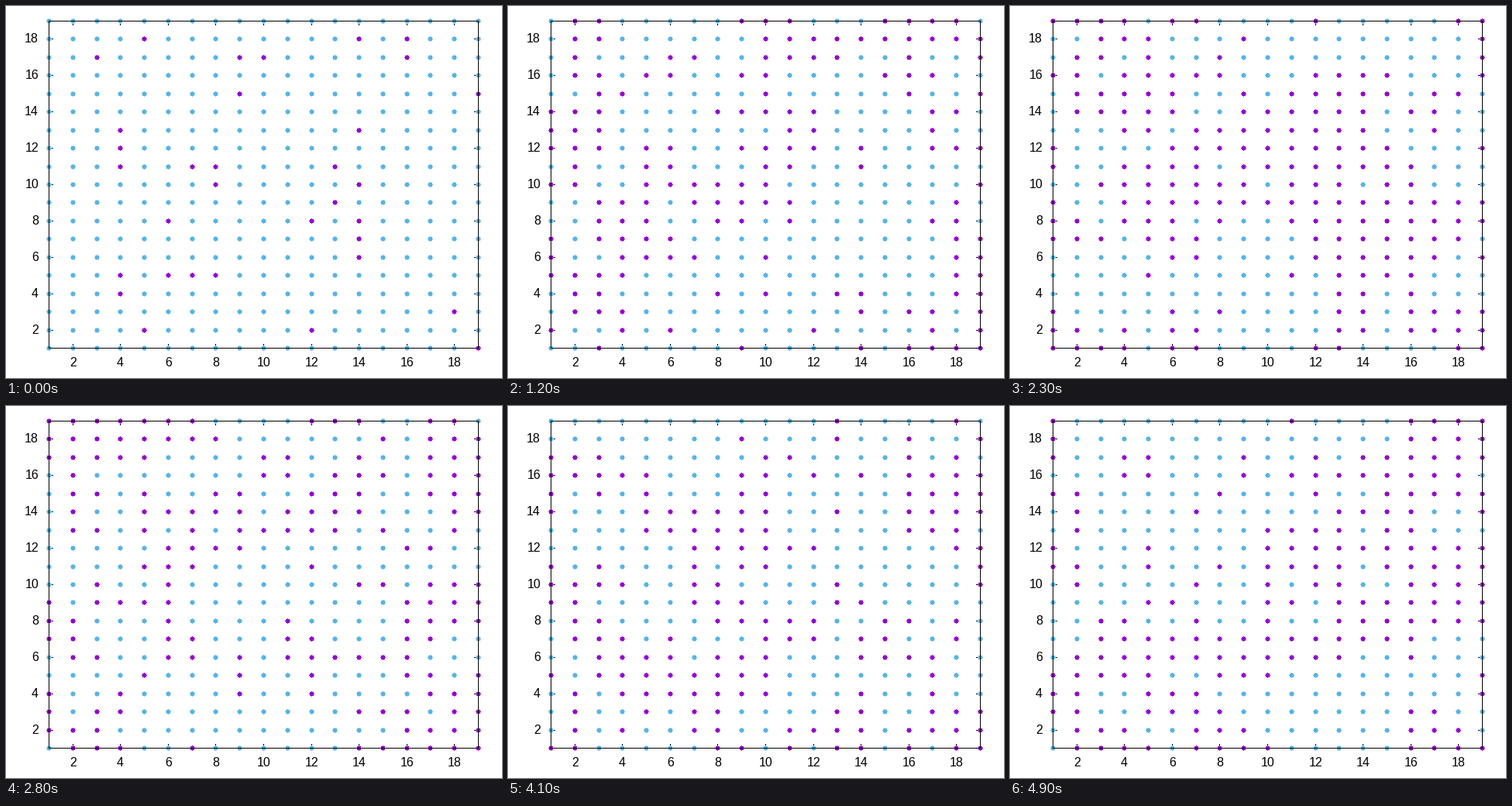
These frames come from a looping animation (640 px wide and 480 px high, 5 s). A matplotlib script:

```python
import math
import random

import matplotlib.pyplot as plt
from matplotlib.animation import FuncAnimation
from matplotlib.collections import PathCollection
from matplotlib.patches import Rectangle
from matplotlib.path import Path
from matplotlib.transforms import Affine2D, IdentityTransform

WIDTH, HEIGHT, DPI = 640, 480, 100
LEFT, RIGHT, TOP, BOTTOM = 55, 609, 19, 441
SIZE = 19
FRAMES, INTERVAL = 50, 100
TEMPERATURE = 3.3
UP, DOWN = "#9400d3", "#56b4e9"
SITES = [(x, y) for y in range(1, SIZE + 1) for x in range(1, SIZE + 1)]


def pixel_x(x):
    return round(LEFT + (x - 1) * (RIGHT - LEFT) / (SIZE - 1))


def pixel_y(y):
    return round(BOTTOM - (y - 1) * (BOTTOM - TOP) / (SIZE - 1))


def wrap(i):
    return (i - 1) % SIZE + 1


def sweep(spins, rng):
    """One Metropolis sweep of the Ising model on a periodic lattice."""
    for _ in SITES:
        x, y = rng.choice(SITES)
        field = (spins[wrap(x + 1), y] + spins[wrap(x - 1), y]
                 + spins[x, wrap(y + 1)] + spins[x, wrap(y - 1)])
        cost = 2 * spins[x, y] * field
        if cost <= 0 or rng.random() < math.exp(-cost / TEMPERATURE):
            spins[x, y] *= -1


def simulate():
    """Colours of all sites per frame, starting from an aligned lattice."""
    rng = random.Random(5)
    spins = dict.fromkeys(SITES, -1)
    history = []
    for _ in range(FRAMES):
        sweep(spins, rng)
        history.append([UP if spins[site] > 0 else DOWN for site in SITES])
    return history


def block(x, y, width, height):
    return Path.unit_rectangle().transformed(
        Affine2D().scale(width, height).translate(x, y))


def bar(x, y, width, height, zorder):
    ax.add_patch(Rectangle((x, y), width, height, color="black", lw=0,
                           zorder=zorder))


def label(x, y, value, align):
    ax.text(x, y, str(value), ha=align, va="baseline", color="black",
            family="Liberation Sans", fontsize=16 * 72 / DPI, zorder=4)


fig = plt.figure(figsize=(WIDTH / DPI, HEIGHT / DPI), dpi=DPI, facecolor="white")
ax = fig.add_axes((0, 0, 1, 1))
ax.set_xlim(0, WIDTH)
ax.set_ylim(HEIGHT, 0)
ax.axis("off")

# Each dot is a 5 px block with a one-pixel tip on every side.
dot = Path.make_compound_path(
    block(-2.5, -2.5, 5, 5), block(-3.5, -0.5, 7, 1), block(-0.5, -3.5, 1, 7))

history = simulate()
dots = PathCollection(
    [dot],
    offsets=[(pixel_x(x) + 0.5, pixel_y(y) + 0.5) for x, y in SITES],
    offset_transform=ax.transData, transform=IdentityTransform(),
    facecolors=history[0], edgecolors="none", linewidths=0, zorder=2)
ax.add_collection(dots, autolim=False)

# The frame lies over the dots, the ticks under them.
for y in (TOP, BOTTOM):
    bar(LEFT, y, RIGHT - LEFT + 1, 1, zorder=3)
for x in (LEFT, RIGHT):
    bar(x, TOP, 1, BOTTOM - TOP + 1, zorder=3)

for value in range(2, SIZE, 2):
    x, y = pixel_x(value), pixel_y(value)
    bar(x, TOP, 1, 6, zorder=1)
    bar(x, BOTTOM - 5, 1, 6, zorder=1)
    bar(LEFT, y, 6, 1, zorder=1)
    bar(RIGHT - 5, y, 6, 1, zorder=1)
    label(x + 0.5, 465, value, "center")
    label(42, y + 5, value, "right")


def update(frame):
    dots.set_facecolor(history[frame])
    return [dots]


animation = FuncAnimation(fig, update, frames=FRAMES, interval=INTERVAL,
                          repeat=True, repeat_delay=0, blit=False)
plt.show()
```
